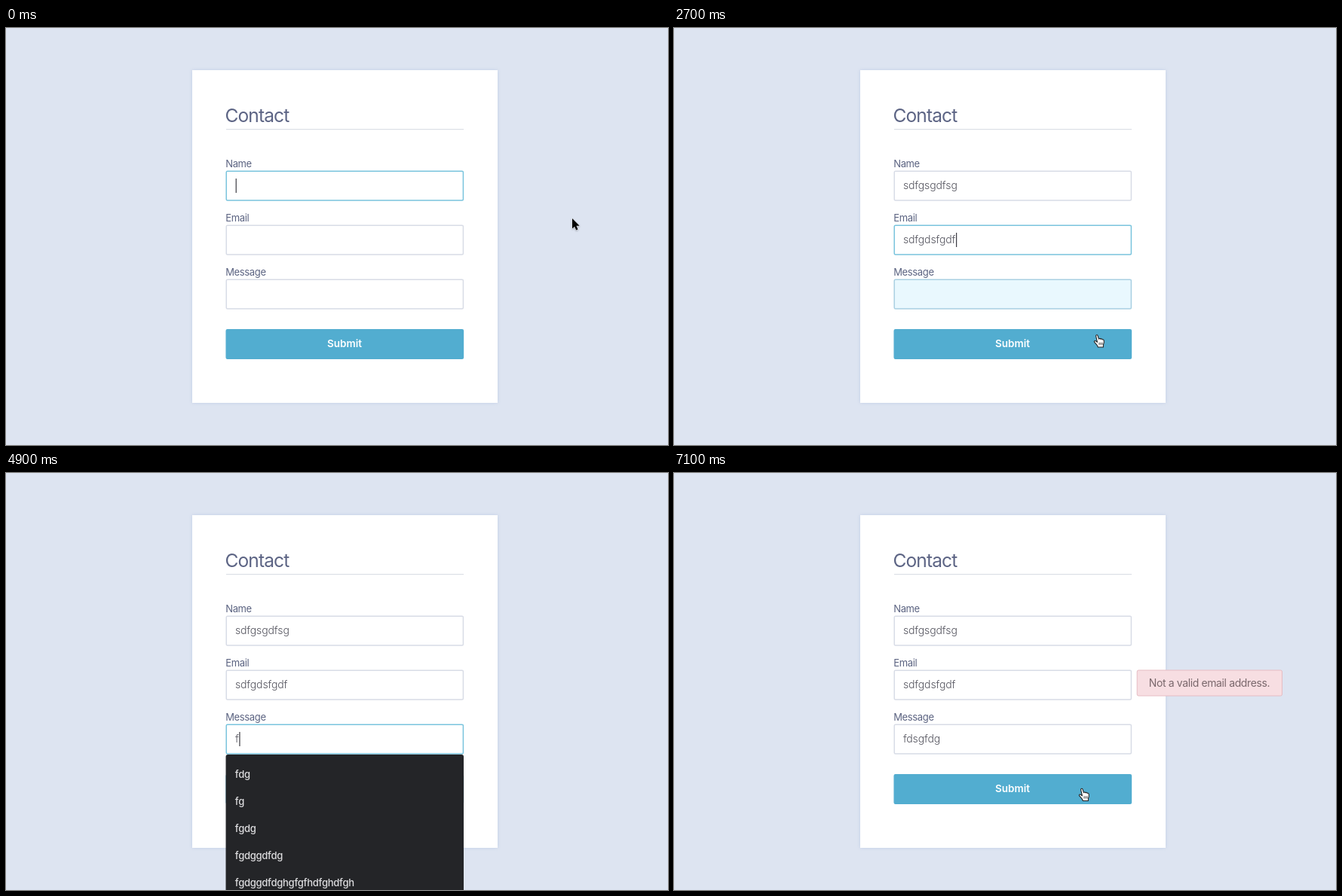
Animation, 878 px wide and 554 px high, one loop 7200 ms. Source, as an HTML page:

```html
<!DOCTYPE html>
<html lang="en">
<head>
<meta charset="utf-8">
<title>Contact form</title>
<style>
html, body { margin: 0; width: 100%; height: 100%; overflow: hidden; background: #dde4f1; }
svg { display: block; width: 100vw; height: 100vh; font-family: Inter, "Open Sans", sans-serif; }
.panel { fill: #fff; filter: drop-shadow(0 0 2px rgba(150, 175, 215, .4)); }
.title { font-size: 24.5px; letter-spacing: -.87px; fill: #5c6484; }
.label { font-size: 13px; letter-spacing: -.35px; fill: #5b6381; }
.box { stroke-width: 1.5; }
.value { font-size: 14px; font-weight: 300; letter-spacing: -.1px; fill: #55555f; }
.caret { fill: #3c3c44; }
.submit { font-size: 13.5px; font-weight: 600; text-anchor: middle; }
.hint { font-size: 12.5px; font-weight: 500; letter-spacing: -.3px; fill: #1c1c1e; }
.bubble { fill: #fff; stroke: #8c8c8c; filter: drop-shadow(2px 3px 2px rgba(0, 0, 0, .45)); }
.error { font-size: 14px; letter-spacing: -.38px; fill: #7a686c; }
.item { font-size: 13px; font-weight: 500; letter-spacing: -.25px; fill: #dedee0; }
.arrow { stroke: #fff; stroke-width: .8; paint-order: stroke; filter: drop-shadow(0 1px 1px rgba(0, 0, 0, .3)); }
.beam { fill: none; stroke: #222; stroke-width: 1.3; }
.hand { fill: #fff; stroke: #222; stroke-width: 1.1; stroke-linejoin: round; }
</style>
</head>
<body>
<svg viewBox="0 0 878 554" preserveAspectRatio="none">
  <rect width="878" height="554" fill="#dde4f1"/>
  <rect class="panel" x="247" y="56" width="405" height="442"/>
  <text class="title" x="290.5" y="125">Contact</text>
  <rect x="292" y="134" width="315" height="1.2" fill="#dcdfe6"/>
  <g id="fields"></g>
  <rect id="button" x="292.2" y="400.7" width="314.2" height="38.6" rx="1.5" stroke-width="1.5"/>
  <text id="submit" class="submit" x="449" y="424">Submit</text>

  <g id="popup">
    <path class="bubble" d="M367 380.5H371.5L378.5 374L385.5 380.5H531Q535 380.5 535 384.5V413.5Q535 417.5 531 417.5H367Q363 417.5 363 413.5V384.5Q363 380.5 367 380.5Z"/>
    <rect x="371" y="388" width="21" height="21" rx="2" fill="#f89a1c"/>
    <path d="M379.7 392H383.3L382.6 400.5H380.4Z" fill="#fff"/>
    <circle cx="381.5" cy="403.4" r="1.6" fill="#fff"/>
    <text class="hint" x="398.2" y="403">Please fill out this field.</text>
  </g>

  <g id="error">
    <rect x="614.2" y="262" width="192.3" height="34" rx="2" fill="#f7dee2" stroke="#e6bcc3"/>
    <text class="error" x="629.8" y="284">Not a valid email address.</text>
  </g>

  <g id="menu">
    <rect id="sheet" x="291.5" y="374" width="315.5" rx="3" fill="#242528"/>
  </g>

  <g id="cursor">
    <path class="arrow" d="M0 0V13.6L3.1 10.7L5.2 15.5L7.5 14.5L5.4 9.8H9.7Z"/>
    <path class="beam" d="M-3.8 -8H-2Q0 -8 0 -6.4Q0 -8 2 -8H3.8M0 -6.4V6.4M-3.8 8H-2Q0 8 0 6.4Q0 8 2 8H3.8M-2.2 3H2.2"/>
    <g class="hand">
      <path d="M2.6 2.2C2.4 .6 4.4 .2 5 1.6L6.4 6.2C6.8 5.2 8.4 5.2 8.8 6.4C9.4 5.6 10.8 5.8 11 7C11.8 6.4 13 7 13.2 8.2C13.6 10.6 13.6 12 12.4 14V17H5.4C4.8 14.6 2.6 12.6 .6 10.4C-.2 9 1.4 8 2.6 9L4.4 10.4Z"/>
      <path d="M7 10.8V14M9 10.8V14M11 10.8V14" stroke-width=".8"/>
    </g>
  </g>
</svg>
<script>
const LOOP = 7200, STEP = 100, FADE = 400, BLINK = 1000;
const SENT = 6000, REPLY = 6400;
const WHITE = [255, 255, 255], BLUE = [82, 173, 208], LINE = [216, 220, 230],
      FOCUS = [121, 196, 221], HOVER = [211, 241, 253];

const $ = id => document.getElementById(id);
const show = (el, on) => { el.style.display = on ? '' : 'none'; };
const clamp = v => Math.min(1, Math.max(0, v));
const ramp = (t, from, length = FADE) => clamp((t - from) / length);
const pulse = (t, on, off) => ramp(t, on) - ramp(t, off);
const mix = (a, b, k) => `rgb(${a.map((v, i) => Math.round(v + (b[i] - v) * k))})`;

function add(parent, tag, attrs, text = '') {
  const el = document.createElementNS('http://www.w3.org/2000/svg', tag);
  for (const key in attrs) el.setAttribute(key, attrs[key]);
  el.textContent = text;
  return parent.appendChild(el);
}

// Times in ms: focus and hover as [on, off], typing as start and pause per key.
const fields = [
  { label: 'Name', text: 'sdfgsgdfsg', start: 700, pause: 50, focus: [-FADE, 1700] },
  { label: 'Email', text: 'sdfgdsfgdf', start: 1800, pause: 50, focus: [1700, 3200], hover: [1000, 2000] },
  { label: 'Message', text: 'fdsgfdg', start: 4800, pause: 120, focus: [3300, 5800], hover: [2200, 2500] }
];
fields.forEach((f, i) => {
  const y = f.y = 190 + 72 * i, root = $('fields');
  add(root, 'text', { class: 'label', x: 291.2, y: y - 5.2 }, f.label);
  f.box = add(root, 'rect', { class: 'box', x: 292.2, y: y + .2, width: 314.2, height: 38.8, rx: 1.5 });
  f.value = add(root, 'text', { class: 'value', x: 303.9, y: y + 23.6 });
  f.bar = add(root, 'rect', { class: 'caret', y: y + 10, width: 1.2, height: 19 });
});

const items = ['fdg', 'fg', 'fgdg', 'fgdggdfdg', 'fgdggdfdghgfgfhdfghdfgh'].map((word, i) =>
  add($('menu'), 'text', { class: 'item', x: 303.8, y: 404.8 + 36 * i }, word));

const home = { x: 751, y: 253 };
const moves = [
  { from: 0, to: 300, x: 647, y: 407 },
  { from: 900, to: 1100, x: 632, y: 288 },
  { from: 1100, to: 1500, x: 571, y: 291 },
  { from: 2100, to: 2700, x: 557, y: 407 },
  { from: 3900, to: 4200, x: 560, y: 381 },
  { from: 5400, to: 5800, x: 537, y: 418.5 }
];

function typed(f, t) {
  return t < f.start ? '' : f.text.slice(0, 1 + (t - f.start) / f.pause);
}

function caretOn(f, t) {
  const [on, off] = f.focus;
  if (t < on || t >= off) return false;
  const lastKey = Math.min(t, f.start + f.pause * (f.text.length - 1));
  const since = t < f.start ? on : lastKey;
  return (t - since) % BLINK < BLINK / 2;
}

function drawField(f, t) {
  const hover = f.hover ? pulse(t, ...f.hover) : 0;
  f.box.style.fill = mix(WHITE, HOVER, hover);
  f.box.style.stroke = mix(LINE, FOCUS, Math.max(hover, pulse(t, ...f.focus)));
  f.value.textContent = typed(f, t);
  const width = f.value.textContent ? f.value.getComputedTextLength() : 0;
  f.bar.setAttribute('x', 304.6 + width);
  show(f.bar, caretOn(f, t));
}

function drawButton(t) {
  const hover = pulse(t, 2700, 3950) + pulse(t, 5500, SENT);
  $('button').style.fill = mix(BLUE, WHITE, hover);
  $('button').style.stroke = mix(BLUE, FOCUS, hover);
  $('submit').style.fill = mix(WHITE, BLUE, hover);
}

// The list keeps the words that begin with what has been typed.
function drawMenu(t) {
  const prefix = typed(fields[2], t);
  const matches = items.filter(item => prefix && item.textContent.startsWith(prefix));
  items.forEach(item => show(item, matches.includes(item)));
  show($('menu'), matches.length > 0);
  $('sheet').setAttribute('height', 16 + 36 * matches.length);
}

function drawCursor(t) {
  let { x, y } = home;
  let moved = 0;
  for (const move of moves.filter(m => m.from <= t)) {
    const k = ramp(t, move.from, move.to - move.from), ease = k * k * (3 - 2 * k);
    x += (move.x - x) * ease;
    y += (move.y - y) * ease;
    moved = move.from;
  }
  const inside = top => x > 292 && x < 607 && y > top && y < top + 39;
  const isHand = inside(401), isBeam = fields.some(f => inside(f.y));
  const [arrow, beam, hand] = $('cursor').children;
  show(arrow, !isHand && !isBeam);
  show(beam, isBeam);
  show(hand, isHand);
  // Typing hides the pointer until it moves again.
  show($('cursor'), !fields.some(f => f.start <= t && f.start > moved));
  $('cursor').setAttribute('transform', `translate(${x} ${y})`);
}

function draw(t) {
  const page = t > SENT && t < REPLY ? SENT : t; // the page stands still while sending
  fields.forEach(f => drawField(f, page));
  drawButton(page);
  drawMenu(page);
  $('popup').style.opacity = pulse(t, 3300, 4400);
  show($('error'), t >= REPLY);
  drawCursor(t);
}

const start = performance.now();
function tick() {
  const t = (performance.now() - start) % LOOP;
  draw(Math.floor(t / STEP) * STEP);
  requestAnimationFrame(tick);
}
tick();
</script>
</body>
</html>
```
